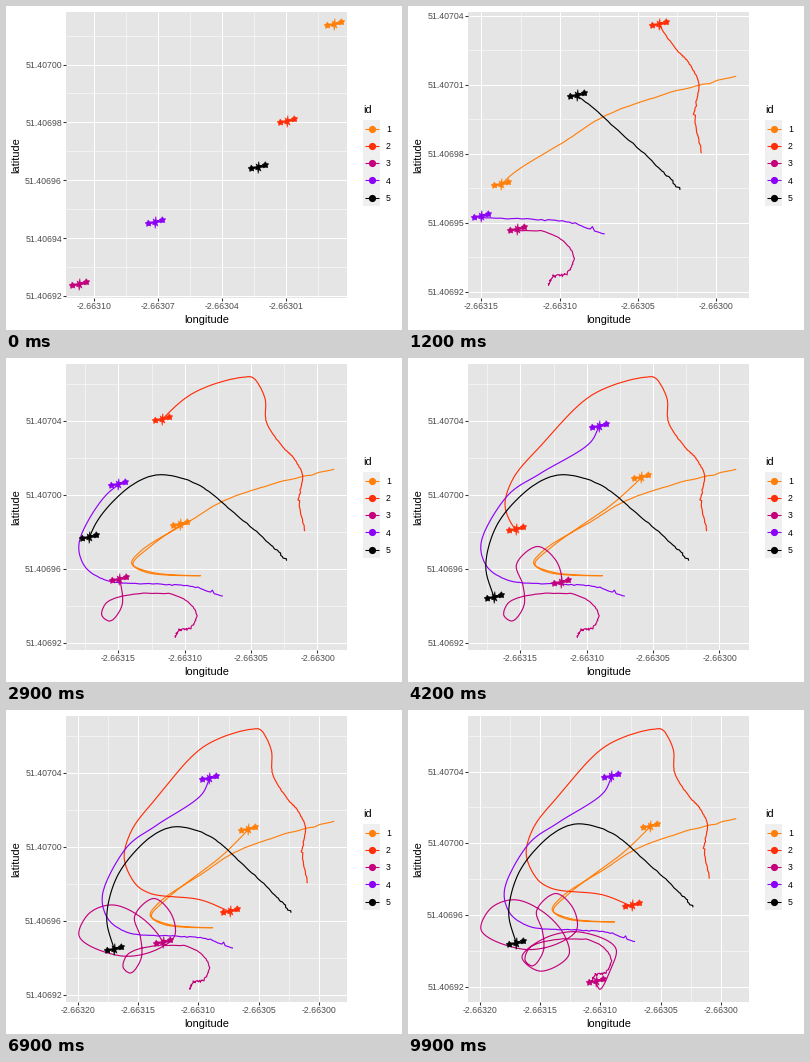
Recreate the animation shown at these times as a matplotlib script. Size 396 by 324 pixels, loop 10 s.

```python
import itertools

import matplotlib.pyplot as plt
import numpy as np
from matplotlib.animation import FuncAnimation
from matplotlib.patches import Rectangle
from matplotlib.path import Path

W, H, DPI = 396, 324, 72
FRAMES, STEP = 100, 100
L, R, T, B = 60, 341, 5.5, 292.3
LON0, LAT0 = -266300, 5140700  # origin in 1e-5 degrees
MAJOR, MINOR = 1.07, 0.53
GREY = "#4d4d4d"

plt.rcParams["font.family"] = "Liberation Sans"

# Colour, then legs {arrival second: key points}, in 1e-5 degrees from origin.
DRONES = [
    ("#ff7f0a", {
        0: [(1.26, 1.38)],
        .8: [(-3.64, .52), (-7.29, -.41), (-9.58, -1.41)],
        1.7: [(-13.3, -3.04), (-14, -3.7), (-12.5, -4.2), (-8.82, -4.38)],
        3.55: [(-12.9, -4.2), (-13.9, -3.75), (-12.5, -2.75), (-8, -.46),
               (-5.92, .89)]}),
    ("#ff2d08", {
        0: [(-.97, -1.97)],
        .8: [(-1.39, -.22), (-1.13, 1.04), (-1.86, 2.05)],
        1.7: [(-2.5, 2.5), (-3.85, 3.95), (-3.95, 5.2), (-4.78, 6.29)],
        4.2: [(-5.4, 6.38), (-9.6, 5.4), (-13.4, 2.7), (-15.6, .8),
              (-16.15, -.6), (-15.34, -1.91)],
        5.3: [(-14.1, -2.5), (-9.78, -2.88), (-7.38, -3.52)]}),
    ("#c2007b", {
        0: [(-10.72, -7.62)],
        .8: [(-10.4, -7.3), (-9.63, -7.25), (-9.11, -6.47), (-10.2, -5.58)],
        1.7: [(-13.64, -5.37), (-15.9, -5.86)],
        2.3: [(-16.25, -6.5), (-15.6, -6.83)],
        4.2: [(-14.73, -6), (-14.8, -4.9), (-15.3, -3.8), (-13.7, -2.8),
              (-12.2, -3.7), (-11.94, -4.76)],
        5.5: [(-13.4, -5.55), (-16.5, -5.9), (-19.9, -4.81)],
        6.9: [(-19.2, -3.7), (-17.1, -3.15), (-14.5, -3.95), (-12.94, -5.19)],
        7.8: [(-12.6, -6.2), (-15, -7.13), (-16.5, -6.35)],
        9.8: [(-14.8, -5.35), (-11.7, -4.95), (-8.7, -5.9), (-9.2, -7.1),
              (-10.03, -8.14), (-10.4, -7.75)]}),
    ("#8c00f5", {
        0: [(-7.13, -5.48)],
        .8: [(-9.4, -4.98), (-12.1, -4.83)],
        1.7: [(-15.9, -4.63), (-17.5, -3.9), (-17.97, -3)],
        2.2: [(-17.8, -2.2)],
        4.1: [(-15.9, 0), (-13.5, 1.15), (-9.7, 2.85), (-9.08, 3.68)]}),
    ("#000000", {
        0: [(-2.33, -3.57)],
        .8: [(-3.5, -2.7), (-6.3, -.97)],
        1.7: [(-8.78, .46), (-11, 1.03), (-12.59, 1)],
        3.6: [(-14.58, .19), (-16.84, -1.75), (-17.6, -3.9),
              (-16.97, -5.6)]}),
]


def star(x, y, rx, ry, points, depth):
    """Closed jagged blob whose radius drops by depth between points."""
    a = np.linspace(0, 2 * np.pi, 2 * points + 1) + .4
    r = 1 - depth * (np.arange(len(a)) % 2)
    return Path(np.c_[x + rx * r * np.cos(a), y + ry * r * np.sin(a)],
                closed=True)


ICON = Path.make_compound_path(
    star(-7, -1, 3.4, 3.4, 5, .4),
    star(7, 2.4, 3.4, 3.4, 5, .4),
    star(0, 0, 3.2, 6, 6, .6),
    Path([(-6, -1.6), (6, .6), (6, 2.4), (-6, .2), (-6, -1.6)], closed=True))
ICON_SIZE = 2 * np.abs(ICON.vertices).max()


def spline(pts, n=12):
    """Smooth curve through pts, n samples per segment."""
    p = np.array(pts, float)
    k = np.append(0, np.cumsum(np.sqrt(np.hypot(*np.diff(p, axis=0).T))))
    m = np.gradient(p, k, axis=0)
    u = np.linspace(0, 1, n, endpoint=False)[:, None]
    v = 1 - u
    out = [v * v * ((1 + 2*u) * p[i] + u * h * m[i])
           + u * u * ((1 + 2*v) * p[i + 1] - v * h * m[i + 1])
           for i, h in enumerate(np.diff(k))]
    return np.vstack([*out, p[-1:]])


def arc(xy):
    return np.append(0, np.cumsum(np.hypot(*np.diff(xy, axis=0).T)))


class Track:
    def __init__(self, color, legs, seed, n=12):
        self.color = color
        self.times = list(legs)
        xy = spline(list(itertools.chain(*legs.values())), n)
        # Unsteady take-off that calms down along the way.
        shake = .05 * np.exp(-arc(xy) / 4)
        shake[0] = 0
        noise = np.random.default_rng(seed).normal(size=xy.shape)
        self.xy = xy + shake[:, None] * noise + (LON0, LAT0)
        self.s = arc(self.xy)
        ends = np.cumsum([len(p) for p in legs.values()]) - 1
        self.marks = self.s[ends * n]

    def trail(self, t):
        s = np.interp(t, self.times, self.marks)
        head = [np.interp(s, self.s, c) for c in self.xy.T]
        return np.vstack([self.xy[self.s < s], head])


def breaks(lo, hi, m=5):
    """Best-scoring round breaks, after Talbot's extended labelling."""
    best, found = -9, None
    span = hi - lo
    for (i, q), z, k in itertools.product(
            enumerate((1, 5, 2, 2.5, 4, 3)), (0, 1), range(2, 10)):
        step = q * 10 ** z
        first = int(np.floor(lo / step)) - 1
        for start in range(first, first + 4):
            a, b = start * step, (start + k - 1) * step
            cover = 1 - .5 * ((hi - b)**2 + (lo - a)**2) / (.1 * span)**2
            ratio = (k - 1) / (b - a) * (max(b, hi) - min(a, lo)) / (m - 1)
            density = 2 - max(ratio, 1 / ratio)
            score = .25 * (1 - i / 5) + .2 * cover + .5 * density
            if score > best:
                best, found = score, (a, step, k)
    return found


def label(v):
    n = int(np.floor(abs(v) + .5))
    return f"{'-' if v < 0 else ''}{n // 100000}.{n % 100000:05d}"


def scale(lo, hi, p0, p1):
    pad = .05 * (hi - lo)
    k = (p1 - p0) / (hi - lo + 2 * pad)
    return lambda v: p0 + (v - lo + pad) * k


fig = plt.figure(figsize=(W / DPI, H / DPI), dpi=DPI, facecolor="white")
ax = fig.add_axes([0, 0, 1, 1])
tracks = [Track(*d, seed=i) for i, d in enumerate(DRONES)]


def line(x, y, color, lw, **kw):
    ax.plot(x, y, color=color, lw=lw, solid_capstyle="butt", **kw)


def box(x, y, w, h, color):
    ax.add_patch(Rectangle((x, y), w, h, fc=color, ec="none"))


def grid(lo, hi, pos, horizontal):
    a, step, k = breaks(lo, hi)
    p0, p1 = (T, B) if horizontal else (L, R)
    ticks = a + step * np.arange(k)
    minors = a + step * (np.arange(k + 1) - .5)
    for vals, lw in ((minors, MINOR), (ticks, MAJOR)):
        for v in vals:
            p = pos(v)
            if not p0 <= p <= p1:
                continue
            if horizontal:
                line([L, R], [p, p], "white", lw)
            else:
                line([p, p], [T, B], "white", lw)
            if lw == MINOR:
                continue
            if horizontal:
                line([L - 2.75, L], [p, p], "#333333", MAJOR)
                ax.text(L - 4, p + 3.2, label(v), size=8.8, color=GREY,
                        ha="right")
            else:
                line([p, p], [B, B + 2.75], "#333333", MAJOR)
                ax.text(p, 303.4, label(v), size=8.8, color=GREY, ha="center")


def legend():
    ax.text(357, 107, "id", size=11)
    for i, tr in enumerate(tracks):
        y = 114 + 17.28 * i
        mid = y + 8.64
        box(357, y, 17.28, 17.28, "#efefef")
        line([358.7, 372.6], [mid, mid], tr.color, MAJOR)
        ax.plot(365.6, mid, "o", ms=7.2, mew=0, color=tr.color)
        ax.text(379.8, mid + 3.2, str(i + 1), size=8.8)


def draw(frame):
    ax.clear()
    ax.set(xlim=(0, W), ylim=(H, 0))
    ax.axis("off")
    trails = [tr.trail(frame * STEP / 1000) for tr in tracks]
    seen = np.vstack(trails)
    (x0, y0), (x1, y1) = seen.min(axis=0), seen.max(axis=0)
    px, py = scale(x0, x1, L, R), scale(y0, y1, B, T)

    box(L, T, R - L, B - T, "#e5e5e5")
    grid(y0, y1, py, True)
    grid(x0, x1, px, False)
    for tr, xy in zip(tracks, trails):
        line(px(xy[:, 0]), py(xy[:, 1]), tr.color, 1.15,
             solid_joinstyle="round")
    for tr, xy in zip(tracks, trails):
        x, y = xy[-1]
        ax.plot(px(x), py(y) - 1, marker=ICON, ms=ICON_SIZE, mew=.5,
                color=tr.color)
    ax.text((L + R) / 2, 317, "longitude", size=11, ha="center")
    ax.text(10, (T + B) / 2, "latitude", size=11, rotation=90,
            ha="center", va="center")
    legend()
    return []


anim = FuncAnimation(fig, draw, frames=FRAMES, interval=STEP, repeat=True,
                     repeat_delay=0, init_func=lambda: [])
plt.show()
```
